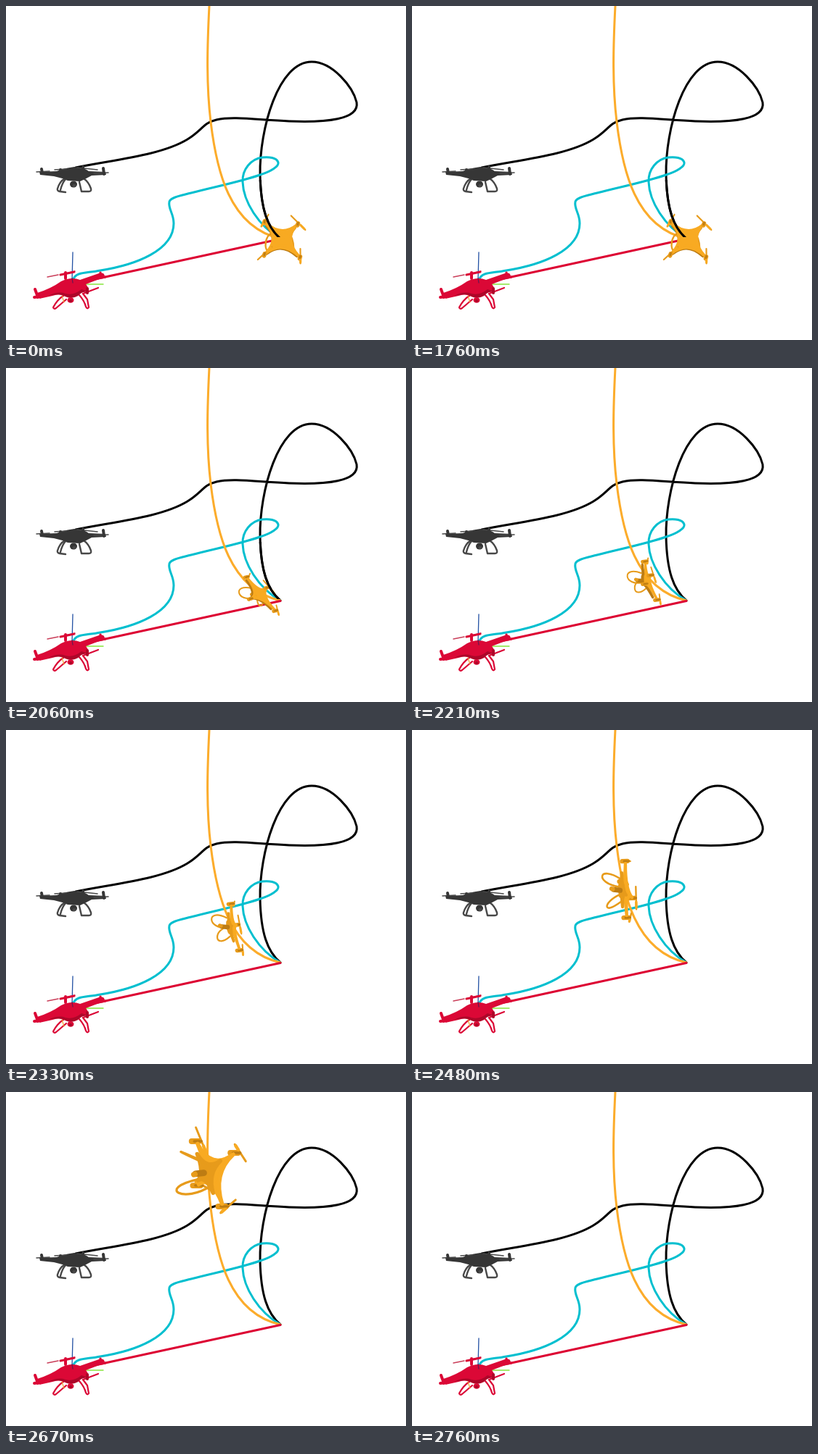
Write an HTML page with a canvas that moves like this. It is 551 px wide and 461 px high and loops after 5000 ms.

```html
<!DOCTYPE html>
<html lang="en">
<head>
<meta charset="utf-8">
<title>Drone trajectories</title>
<style>
html, body { margin: 0; width: 100%; height: 100%; overflow: hidden; background: #fff; }
canvas { display: block; }
</style>
</head>
<body>
<canvas id="stage" width="551" height="461"></canvas>
<script>
const ctx = document.getElementById('stage').getContext('2d');
const LOOP = 5000, STEP = 100 / 3, PHASE = 1940, GONE = 2760;

const trails = {
  black: ['#000', 'M96,223 C150,212 214,206 250,184 C270,172 272,161 290,157 C312,152 345,157 390,159 ' +
    'C440,161 487,157 483,133 C478,112 450,77 421,77 C375,77 349,170 350,233 C351,280 360,306 378,321'],
  cyan: ['#00bfcf', 'M93,377 C96,367 110,369 130,365 C180,357 231,337 231,300 C231,286 223,280 225,270 ' +
    'C227,264 240,262 255,258 C290,249 325,242 350,233 C366,228 376,221 375,216 ' +
    'C373,209 362,208 353,209 C338,211 325,225 326,243 C327,270 348,304 378,321'],
  orange: ['#fcac2b', 'M280,0 C277,60 276,110 282,160 C290,226 307,305 378,321'],
  red: ['#dd0433', 'M100,382 L378,321.5']
};
for (const name in trails) trails[name][1] = new Path2D(trails[name][1]);

// time, centre, four motor offsets (clockwise), downward vector
const poses = [
  [1740, 380, 321, -24, -23, 22, -20, 25, 26, -24, 22, -3, 10],
  [1940, 365, 319, -27, -24, 13, -11, 24, 21, -20, 7, -12, 5],
  [1940 + 8 * STEP, 323, 293, -2, -26, 6, -7, 15, 27, -2, 5, -20, 3],
  [1940 + 16 * STEP, 293, 221, 1, -40, 11, 11, 3, 38, -3, -12, -26, 1],
  [1940 + 19 * STEP, 284, 160, 22, -28, 10, 38, -12, 15, -14, -36, -31, -1],
  [1940 + 24 * STEP, 281, 36, 50, -30, 30, 55, -26, 28, -28, -52, -52, 3]
];

function slope(i, k) {
  if (i === 0) return 0;
  const a = poses[i - 1], b = poses[Math.min(i + 1, poses.length - 1)];
  return (b[k] - a[k]) / (b[0] - a[0]);
}

function poseAt(t) {
  t = Math.max(poses[0][0], Math.min(t, poses[poses.length - 1][0]));
  let i = 0;
  while (i < poses.length - 2 && t >= poses[i + 1][0]) i++;
  const a = poses[i], b = poses[i + 1], span = b[0] - a[0];
  const u = (t - a[0]) / span, u2 = u * u, u3 = u2 * u;
  return a.map((v, k) => k === 0 ? t :
    v * (2 * u3 - 3 * u2 + 1) + b[k] * (3 * u2 - 2 * u3) +
    span * (slope(i, k) * (u3 - 2 * u2 + u) + slope(i + 1, k) * (u3 - u2)));
}

function shape(d, color) {
  ctx.fillStyle = color;
  ctx.fill(new Path2D(d));
}

function wire(d, color, width) {
  ctx.strokeStyle = color;
  ctx.lineWidth = width;
  ctx.stroke(d instanceof Path2D ? d : new Path2D(d));
}

function dot(x, y, rx, ry, color) {
  ctx.fillStyle = color;
  ctx.beginPath();
  ctx.ellipse(x, y, rx, ry, 0, 0, 7);
  ctx.fill();
}

function trail(name) {
  wire(trails[name][1], trails[name][0], 3);
}

// weighted sum of 2D vectors: mix(v, 1, w, 2) = v + 2w
function mix(...p) {
  let x = 0, y = 0;
  for (let i = 0; i < p.length; i += 2) {
    x += p[i][0] * p[i + 1];
    y += p[i][1] * p[i + 1];
  }
  return [x, y];
}

function flyer(pose) {
  const [t, cx, cy, ...v] = pose;
  const m = [0, 2, 4, 6].map(i => [v[i], v[i + 1]]), down = [v[8], v[9]];
  const size = Math.max(...m.map(p => Math.hypot(...p)));
  const axisA = mix(m[0], .5, m[2], -.5), axisB = mix(m[1], .5, m[3], -.5);
  const front = mix(m[0], .25, m[1], .25, m[2], -.25, m[3], -.25);
  const side = mix(m[1], .25, m[2], .25, m[0], -.25, m[3], -.25);
  const blades = [[-.08, -.3], [-.4, 0], [-.22, -.23], [0, .42]];
  const light = '#f8aa22', mid = '#e79b1b', dark = '#bd7c13';

  const outline = (color, width) => {
    ctx.strokeStyle = color;
    ctx.lineWidth = width * size;
    ctx.stroke();
  };
  const line = (pts, color, width) => {
    ctx.beginPath();
    pts.forEach(p => ctx.lineTo(...p));
    outline(color, width);
  };
  const hull = (drop, color, reach) => {
    const at = mix(down, drop);
    ctx.beginPath();
    ctx.moveTo(...mix(at, 1, m[0], reach));
    m.forEach((p, i) => {
      const q = m[(i + 1) % 4];
      ctx.quadraticCurveTo(...mix(at, 1, p, .05, q, .05), ...mix(at, 1, q, reach));
    });
    ctx.fillStyle = color;
    ctx.fill();
    outline(color, .11);
    ctx.beginPath();
    m.forEach(p => ctx.lineTo(...mix(at, 1, p, .2)));
    ctx.closePath();
    ctx.fill();
    outline(color, .2);
  };
  const legs = () => {
    for (const s of [-1, 1]) {
      const hip = f => mix(side, s * .4, front, f, down, .2);
      const foot = f => mix(side, s * .95, front, f, down, 1.35);
      ctx.beginPath();
      ctx.moveTo(...hip(.4));
      ctx.bezierCurveTo(...foot(.9), ...foot(-.9), ...hip(-.4));
      outline(mid, .065);
    }
    line([mix(down, .25), mix(down, .6, front, .1)], dark, .18);
    line([mix(down, .65, front, .15), mix(down, .72, front, .2)], mid, .15);
  };
  const rotors = () => m.forEach((p, i) => {
    line([mix(p, 1, down, .17), mix(p, 1, down, -.1)], mid, .16);
    const hub = mix(p, 1, down, -.18), [a, b] = blades[i];
    const d = mix(axisA, a, axisB, b);
    line([mix(hub, 1, d, -1), mix(hub, 1, d, 1)], mid, .06);
    line([mix(hub, 1, d, .35), mix(hub, 1, d, .85)], light, .09);
    line([mix(p, 1, down, .08), hub], dark, .07);
  });

  ctx.save();
  ctx.translate(cx, cy);
  if (t < 2300) {
    legs();
    hull(.2, dark, .85);
    hull(0, light, .92);
    rotors();
  } else {
    rotors();
    hull(0, light, .92);
    hull(.18, mid, .6);
    legs();
  }
  ctx.restore();
}

function darkDrone() {
  const c = '#363636', soft = '#484848';
  wire('M81,238 Q74,242 71,252 Q70,255 74,256 L82,257 M82,239 Q77,245 75,254', soft, 2.4);
  wire('M107,238 Q114,243 117,252 Q118,256 114,256 L104,256 L101,243', soft, 2.4);
  shape('M46,229 L70,228 Q78,224 94,222 Q108,223 114,228 L137,229 L138,233 L118,234 ' +
    'Q109,239 102,242 L85,241 Q76,237 66,235 L47,233 Z', c);
  wire('M42,229 L60,228 M67,226 L83,225 M98,223 L126,226 M121,231 L141,230', soft, 1.6);
  wire('M49,225 L50,231 M134,224 L135,232', c, 4);
  wire('M75,226 L75,230 M106,222 L106,229', c, 4);
  dot(93, 246, 5, 4.5, c);
  dot(94, 248, 2.5, 2.2, soft);
}

function redDrone() {
  const c = '#db0836', low = '#ad0629';
  wire('M92,340 L91,378', '#2452a4', 1.3);
  wire('M105,384 L134,384', '#87e53b', 1.3);
  wire('M80,399 Q70,406 65,416 Q66,419 69,417 L83,405', c, 2.2);
  wire('M101,399 Q108,407 110,415 Q112,419 114,416 L112,405 L106,397', c, 2.2);
  wire('M77,400 L80,409', '#f0a030', 1.2);
  wire('M57,374 L72,371 M82,369 L95,366', '#c93d58', 1.3);
  wire('M75,371 L94,367', c, 3);
  shape('M43,396 Q62,390 76,380 Q90,373 102,378 L128,369 Q136,367 136,374 ' +
    'L110,384 Q115,390 113,395 Q104,393 99,400 Q90,405 82,401 Q75,396 64,400 L46,404 Z', c);
  shape('M58,400 Q72,393 82,397 Q93,400 104,391 L113,394 Q104,394 99,400 Q90,405 82,401 Q75,396 58,400 Z', low);
  wire('M40,391 L44,402 M39,402 L46,401', c, 4);
  wire('M120,377 L137,374 M130,368 L131,375', c, 3.2);
  wire('M82,368 L82,376', c, 4);
  wire('M106,397 L127,389', c, 2.2);
  wire('M112,390 L112,396', low, 4);
  wire('M91,376 L92,382', '#6c164e', 1.3);
  dot(89, 406, 4.5, 3.8, c);
  dot(89, 407, 2.3, 2, low);
}

function draw(t) {
  ctx.fillStyle = '#fff';
  ctx.fillRect(0, 0, 551, 461);
  ctx.lineCap = ctx.lineJoin = 'round';
  ['black', 'cyan', 'orange', 'red'].forEach(trail);
  darkDrone();
  redDrone();
  if (t >= GONE) return;
  flyer(poseAt(PHASE + Math.floor((t - PHASE) / STEP + 1e-6) * STEP));
  if (t < 2100) {
    // near the start the black trail passes in front of the arms
    ctx.save();
    ctx.beginPath();
    ctx.rect(340, 240, 60, 79);
    ctx.clip();
    trail('black');
    ctx.restore();
  }
}

const start = performance.now();
function tick() {
  draw((performance.now() - start) % LOOP);
  requestAnimationFrame(tick);
}
tick();
</script>
</body>
</html>
```
